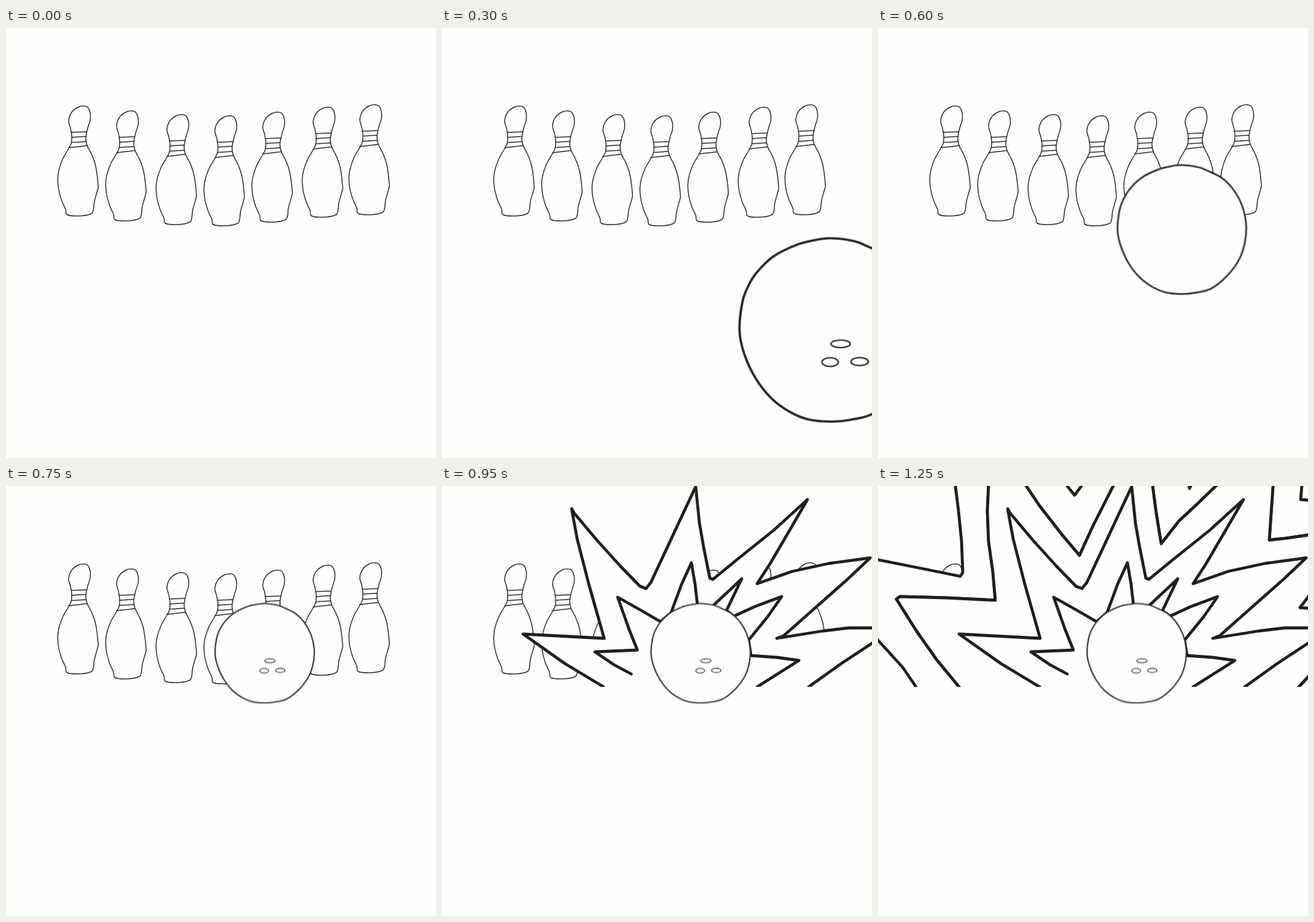
Animation, 700 px wide and 700 px high, one loop 1350 ms. Source, as an HTML page:

```html
<!DOCTYPE html>
<html lang="en">
<head>
<meta charset="utf-8">
<title>Bowling strike</title>
<style>
  html, body { margin: 0; width: 100%; height: 100%; overflow: hidden; background: #fefefe; }
  svg { display: block; width: 100vw; height: 100vh; }
  path, ellipse { fill: #fefefe; stroke: #2b2b2b; stroke-linejoin: round; stroke-linecap: round; }
  .pin { stroke-width: 1.5; }
  .ball { stroke-width: 3.3; }
  .hole { stroke-width: 2; }
  .ring { stroke: #1f1f1f; stroke-width: 4.8; }
  .patch { fill: #fefefe; }

  .ball-move, .low, .high, .burst > g { animation: 1350ms step-end infinite; }
  .ball-move { animation-name: roll; }
  .low { animation-name: low; }
  .high { animation-name: high; }
  #burst1 { animation-name: burst1; }
  #burst2 { animation-name: burst2; }
  #burst3 { animation-name: burst3; }
  #burst4 { animation-name: burst4; }
  #burst5 { animation-name: burst5; }

  @keyframes roll {
    0%     { opacity: 0; transform: translate(673px, 625px) scale(1.39); }
    11.11% { opacity: 1; transform: translate(673px, 625px) scale(1.39); }
    22.22% { opacity: 1; transform: translate(633px, 492px) scale(1.18); }
    33.33% { opacity: 1; transform: translate(572px, 395px) scale(1); }
    44.44% { opacity: 1; transform: translate(494.5px, 328.5px) scale(.83); }
    55.55%, 100% { opacity: 1; transform: translate(421px, 272.5px) scale(.64); }
  }
  @keyframes low {
    0% { opacity: 0; } 22.22% { opacity: 1; } 33.33% { opacity: 0; }
    55.55%, 100% { opacity: 1; }
  }
  @keyframes high { 0% { opacity: 0; } 33.33% { opacity: 1; } 44.44%, 100% { opacity: 0; } }
  @keyframes burst1 { 0% { opacity: 0; } 62.96%, 100% { opacity: 1; } }
  @keyframes burst2 { 0% { opacity: 0; } 70.37%, 100% { opacity: 1; } }
  @keyframes burst3 { 0% { opacity: 0; } 77.77%, 100% { opacity: 1; } }
  @keyframes burst4 { 0% { opacity: 0; } 85.18%, 100% { opacity: 1; } }
  @keyframes burst5 { 0% { opacity: 0; } 92.59%, 100% { opacity: 1; } }
</style>
</head>
<body>
<svg viewBox="0 0 700 700">
  <defs>
    <clipPath id="sky"><rect width="700" height="327"/></clipPath>
    <g id="pin">
      <path class="pin" id="pin-shape"/>
      <path class="pin" d="M106 170L131 169M107 178L130 176.5M107 186.5L130 185M102 195L132 191.5"/>
    </g>
  </defs>
  <g id="pins"></g>
  <g class="burst" clip-path="url(#sky)">
    <g id="burst5"><path class="ring" d="M62 327L40 295L0 251L-60 180L-60 108L0 120L60 132L134 147L138 141L136 90L131 40L126 0L122 -60H270L308 0L320 15L331 0L370 -60H500L507 4L540 -60H692L690 0L688 22L700 23L760 20V327"/></g>
    <g id="burst4"><path class="ring" id="ring3-full"/></g>
    <g id="burst3"><path class="ring" id="ring3"/></g>
    <g id="burst2"><path class="ring" d="M263 327L200 289L132 241L264 248L239 160L220 86L211 37L215 44L252 88L290 130L322 163L332 167L340 157L383 65L413 1L419 60L426 100L436 150L441 152L480 120L540 72L595 22L570 65L535 125L513 159L570 139L630 126L697 117L660 152L600 205L556 244L545 248L620 236L662 231L740 231L700 256L650 289L597 327"/></g>
    <g id="burst1">
      <rect class="patch" x="308" y="300" width="205" height="27"/>
      <path class="ring" d="M308 306L280 291L249 270L318 267L304 232L286 181L325 203L356 221L373 206L390 160L406 125L412 160L416 195L440 196L488 151L463 203L475 212L510 196L553 180L530 213L499 251L503 276L545 279L581 284L513 327"/>
    </g>
  </g>
  <g class="ball-move">
    <path class="ball" id="ball"/>
    <g class="low">
      <ellipse class="hole" cx="13.5" cy="18.8" rx="13.3" ry="5.2"/>
      <ellipse class="hole" cx="-1" cy="44" rx="11.3" ry="6"/>
      <ellipse class="hole" cx="39.7" cy="43.3" rx="12" ry="5.5"/>
    </g>
    <g class="high">
      <ellipse class="hole" cx="-14" cy="-105" rx="10" ry="4"/>
      <ellipse class="hole" cx="18" cy="-103" rx="12" ry="3.2"/>
      <path class="hole" d="M-11 -82C-9 -88 -4 -91 1 -91S10 -88 11 -82C9 -77 -9 -77 -11 -82Z"/>
    </g>
  </g>
</svg>
<script>
  const byId = id => document.getElementById(id);

  // Closed smooth curve through "x,y" points.
  function smooth(text) {
    const pts = text.split(' ').map(p => p.split(',').map(Number));
    const at = i => pts[(i + pts.length) % pts.length];
    const ctrl = (i, s) => at(i).map((v, k) => v + s * (at(i + 1)[k] - at(i - 1)[k]) / 6);
    return 'M' + pts[0] + pts.map((p, i) =>
      `C${ctrl(i, 1)} ${ctrl(i + 1, -1)} ${at(i + 1)}`).join('') + 'Z';
  }

  byId('pin-shape').setAttribute('d', smooth(
    '127,127 118,128.5 107,137 102,151 105,163 107,176 106,188 101,198 92,214 85,237 ' +
    '85,258 90,279 97,295 99.5,304 118,306 137,303 142,297 144,282 149,264 150,256 ' +
    '146,225 140,207 132,191 130,179 133,163 137,150 137,138 133,129'));

  byId('ball').setAttribute('d', smooth(
    '0,-127 32,-123 50,-116 78,-102 101,-79 118,-48 126,-12 124,23 113,57 90,89 58,115 ' +
    '30,123 0,126 -31,123 -56,113 -82,94 -104,66 -120,31 -126,0 -122,-39 -114,-61 ' +
    '-102,-80 -79,-102 -47,-118 -24,-124'));

  const offsets = [[0, 0], [78, 8], [160, 14], [238, 16], [316, 10], [398, 2], [474, -2]];
  byId('pins').innerHTML = offsets.map(([x, y]) => `<use href="#pin" x="${x}" y="${y}"/>`).join('');

  // The third ring opens on its left side before the right side closes.
  const left = 'M132 327L95 282L62 235L30 184L36 180L110 182L191 186L187 140L180 90L178 40L180 0' +
    'L184 -70L194 -70L240 -2L262 31L300 80L328 113L350 65L383 0L417 -70H437L447 0L453 45L461 94' +
    'L490 57L520 29L550 0L640 -80L643 0L637 88L665 85L720 77';
  byId('ring3').setAttribute('d', left + 'L760 110');
  byId('ring3-full').setAttribute('d', left + 'L760 72L700 181L687 198L700 199L790 200L700 311L685 327');
</script>
</body>
</html>
```
